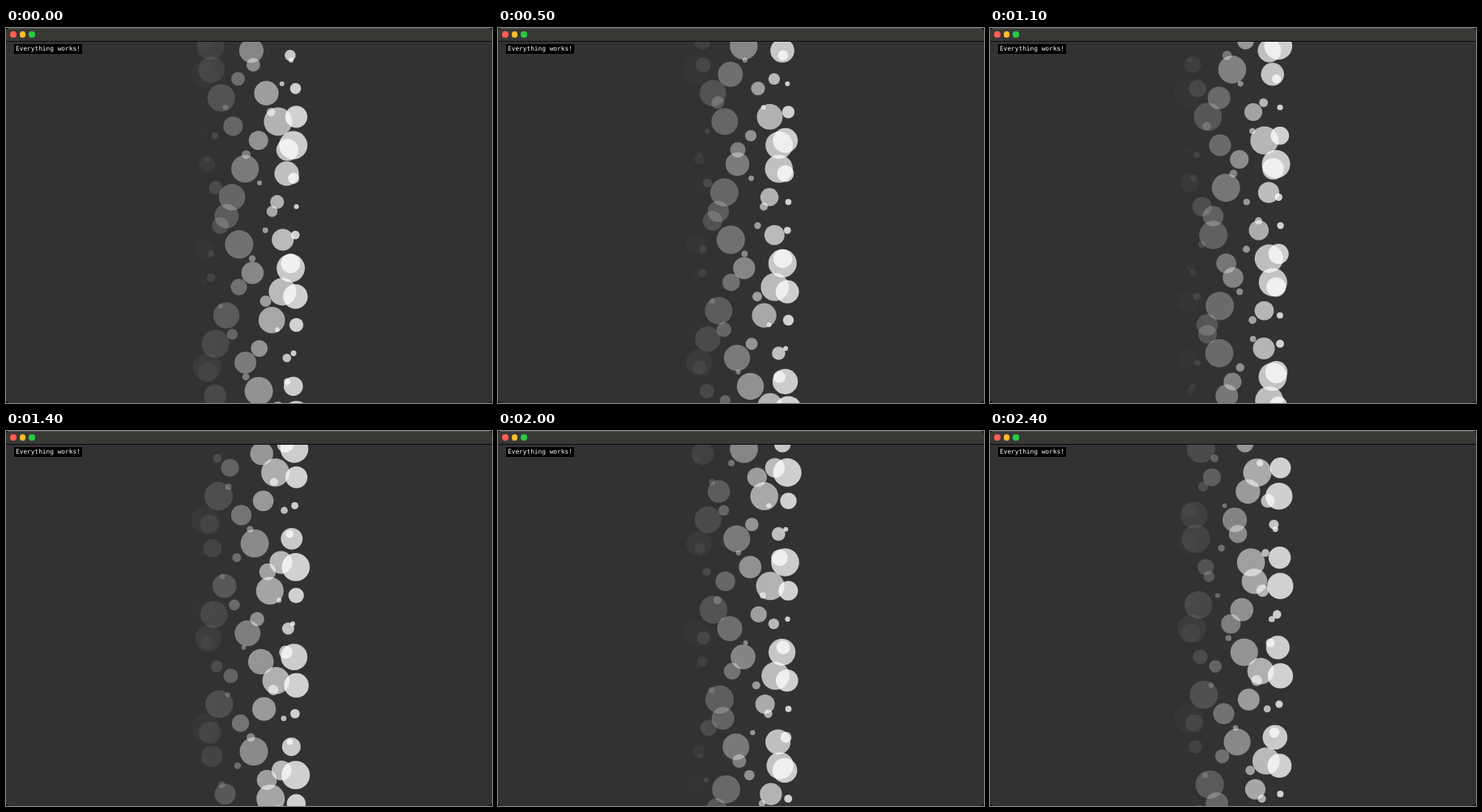
An HTML page with a canvas that plays this animation: 600 by 464 pixels, repeating every 2.5 s.

```html
<!DOCTYPE html>
<html lang="en">
<head>
<meta charset="utf-8">
<title>Circle wave</title>
<style>
  html, body { margin: 0; width: 100%; height: 100%; overflow: hidden; background: #111; }
  .window {
    position: absolute; left: 0; top: 0; width: 600px; height: 464px;
    overflow: hidden; border-radius: 5px; background: #333133;
  }
  .bar {
    position: absolute; left: 0; top: 0; width: 600px; height: 16px;
    box-sizing: border-box; background: #383835; border-top: 1px solid #55554f;
  }
  .line { position: absolute; left: 0; top: 16px; width: 600px; height: 1px; background: #0c0c0c; }
  .dot { position: absolute; top: 4.3px; width: 7.4px; height: 7.4px; border-radius: 50%; }
  canvas { position: absolute; left: 0; top: 17px; }
  .label {
    position: absolute; left: 10px; top: 20px; width: 84px; height: 11.5px;
    box-sizing: border-box; padding-left: 2px; background: #000; color: #fff;
    font: 7.8px/11.5px "DejaVu Sans Mono", monospace; white-space: pre;
  }
</style>
</head>
<body>
<div class="window">
  <canvas id="stage" width="600" height="447"></canvas>
  <div class="bar"></div>
  <div class="line"></div>
  <div class="dot" style="left:5.2px;background:#ff5f57"></div>
  <div class="dot" style="left:16.8px;background:#febc2e"></div>
  <div class="dot" style="left:28.3px;background:#28c840"></div>
  <div class="label">Everything works!</div>
</div>
<script>
  const LOOP = 2500, STEP = 100;
  const TOP = -0.7, GAP = 5.85, COUNT = 84;
  const ctx = document.getElementById('stage').getContext('2d');

  // The sway moves at a steady rate; the size wave tightens over time.
  function draw(sec) {
    const phase = -1.95 + 2.015 * sec;
    const sizeFreq = 1.208 + 0.0507 * sec;
    ctx.clearRect(0, 0, 600, 447);
    for (let i = 0; i < COUNT; i++) {
      const sway = Math.sin(i + phase);
      const radius = 10.25 + 7.3 * Math.sin(i * sizeFreq);
      ctx.fillStyle = `rgba(255,255,255,${0.39 * (1 + sway)})`;
      ctx.beginPath();
      ctx.arc(300 + 58.6 * sway, TOP + GAP * i, radius, 0, Math.PI * 2);
      ctx.fill();
    }
  }

  const start = performance.now();
  function tick() {
    const time = (performance.now() - start) % LOOP;
    draw(Math.floor(time / STEP) * STEP / 1000);
    requestAnimationFrame(tick);
  }
  tick();
</script>
</body>
</html>
```
